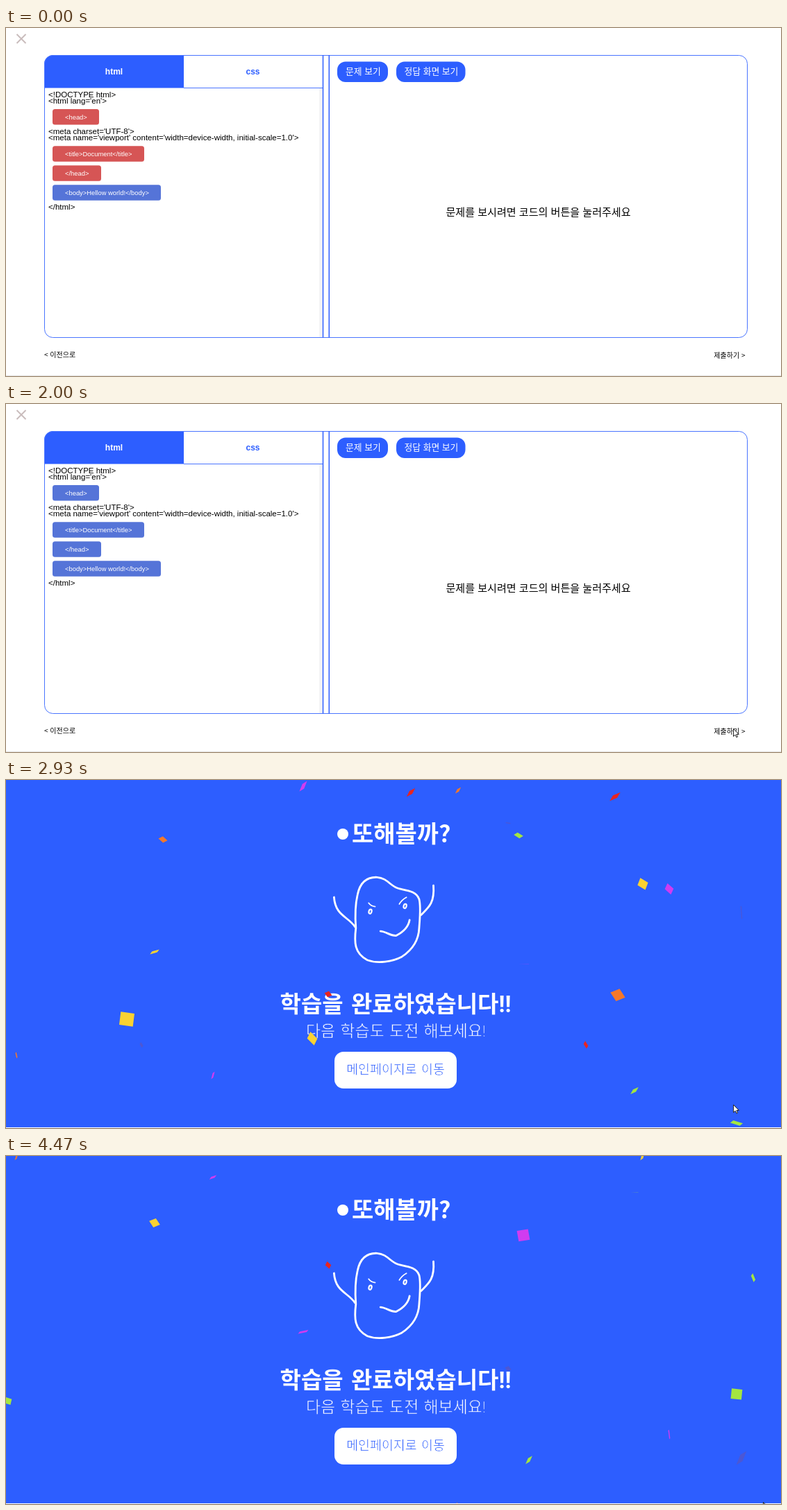
Animation, 1116 px wide and 502 px high, one loop 4540 ms. Source, as an HTML page with a canvas:

```html
<!DOCTYPE html>
<html lang="ko">
<head>
<meta charset="UTF-8">
<title>학습 완료</title>
<style>
  html, body { margin: 0; width: 100%; height: 100%; overflow: hidden; background: #fff; }
  svg, canvas { position: absolute; left: 0; top: 0; width: 1116px; height: 502px; display: block; }
  text { font-family: "Noto Sans CJK KR", "Noto Sans CJK", "Noto Sans CJK JP", sans-serif; white-space: pre; }
  .latin { font-family: "Liberation Sans", Arial, sans-serif; }
  .mixed { font-family: Roboto, "Noto Sans CJK KR", "Noto Sans CJK", "Noto Sans CJK JP", sans-serif; }
</style>
</head>
<body>
<svg viewBox="0 0 1116 502">
  <g id="editor"></g>
  <g id="done"></g>
</svg>
<canvas id="fx" width="1116" height="502"></canvas>
<script>
const LOOP = 4540, FPS = 15, SWITCH = 2060;
const BLUE = '#2d5eff', EDGE = '#4a75ff';
const editor = document.getElementById('editor');
const done = document.getElementById('done');
const ctx = document.getElementById('fx').getContext('2d');

function add(parent, tag, attrs, text) {
  const el = document.createElementNS('http://www.w3.org/2000/svg', tag);
  for (const k in attrs) el.setAttribute(k, attrs[k]);
  if (text) el.textContent = text;
  parent.appendChild(el);
  return el;
}
const box = (g, x, y, width, height, rx, fill) => add(g, 'rect', { x, y, width, height, rx, fill });
const line = (g, d, stroke, width) => add(g, 'path', { d, stroke, 'stroke-width': width, fill: 'none' });
const label = (g, text, x, y, size, fill, more) =>
  add(g, 'text', { x, y, 'font-size': size, fill, ...more }, text);

const clamp = v => Math.min(1, Math.max(0, v));
const mix = (a, b, f) => a + (b - a) * f;

// Editor page
const tags = [];
function buildEditor() {
  const latin = { class: 'latin' };
  const tab = { class: 'latin', 'font-weight': 700, 'text-anchor': 'middle' };
  const medium = { 'font-weight': 500 };

  line(editor, 'M15.5 9L28.5 22M28.5 9L15.5 22', '#c9bcbc', 2);
  box(editor, 451, 87, 4.5, 359, 0, '#f4f4f5');
  add(editor, 'path', { d: 'M55 86.5V52A13 13 0 0 1 68 39H256V86.5Z', fill: BLUE });
  add(editor, 'rect', { x: 55.5, y: 39.5, width: 1012, height: 407, rx: 12, fill: 'none', stroke: EDGE });
  line(editor, 'M256 86.5H456', EDGE, 1);
  line(editor, 'M456.5 39V446.5M465.3 39V446.5', BLUE, 1.5);
  label(editor, 'html', 155.5, 67, 12, '#fff', tab);
  label(editor, 'css', 355.5, 67, 12, BLUE, tab);

  // Plain lines are 9.4 px apart, blocks (marked *) take 28 px
  const code = [
    '<!DOCTYPE html>', "<html lang='en'>", '*<head>', "<meta charset='UTF-8'>",
    "<meta name='viewport' content='width=device-width, initial-scale=1.0'>",
    '*<title>Document</title>', '*</head>', '*<body>Hellow world!</body>', '</html>'
  ];
  let y = 91;
  code.forEach((row, i) => {
    if (row[0] !== '*') {
      label(editor, row, 61, y + 9, 11.5, '#000', latin);
      y += 9.3;
      return;
    }
    const block = box(editor, 67, y + 7.5, 0, 22.5, 3.5, '#5574d8');
    const text = label(editor, row.slice(1), 85, y + 21.9, 9.4, '#fff', latin);
    block.setAttribute('width', Math.round(text.getComputedTextLength() + 35.5));
    if (tags.length < 3) tags.push(block);
    y += code[i + 1][0] === '*' ? 28 : 34.5;
  });

  box(editor, 477, 48.5, 73, 29.5, 12, BLUE);
  box(editor, 562, 48.5, 99.5, 29.5, 12, BLUE);
  label(editor, '문제 보기', 489, 67, 12.8, '#fff', medium);
  label(editor, '정답 화면 보기', 573.5, 67, 12.8, '#fff', medium);
  label(editor, '문제를 보시려면 코드의 버튼을 눌러주세요', 766.5, 270.7, 15.05, '#000',
    { ...medium, 'text-anchor': 'middle' });
  label(editor, '< 이전으로', 55, 474.8, 10, '#000', medium);
  label(editor, '제출하기 >', 1064.5, 475.8, 10, '#000', { ...medium, 'text-anchor': 'end' });
  box(editor, 0, 501, 1116, 1, 0, '#e6e6e6');
}

// Completion page; an outline in the background colour thins light text
function buildDone() {
  const mixed = { class: 'mixed', 'text-anchor': 'middle' };
  const thin = back => ({ ...mixed, 'font-weight': 300, stroke: back, 'stroke-width': 0.6, 'word-spacing': 1.8 });
  box(done, 0, 0, 1116, 501, 0, BLUE);
  add(done, 'circle', { cx: 485, cy: 78, r: 8, fill: '#fff' });
  label(done, '또해볼까?', 498, 90, 34, '#fff', { 'font-weight': 900 });
  label(done, '학습을 완료하였습니다!!', 561, 334.5, 33, '#fff', { ...mixed, 'font-weight': 700, 'word-spacing': 3 });
  label(done, '다음 학습도 도전 해보세요!', 561.5, 370, 22.9, '#fff', thin(BLUE));
  box(done, 473, 392, 176, 53, 13, '#fff');
  label(done, '메인페이지로 이동', 561, 424, 18.4, BLUE, thin('#fff'));
}

// Mascot
const BODY = new Path2D('M553 139C536 137 527 148 523 162C518 178 517 196 517 210C513 230 512 246 530 257' +
  'C545 264 566 262 580 256C596 247 606 234 608 216C610 202 613 186 611 175C608 164 598 162 584 158' +
  'C572 155 568 141 553 139Z');
const LIMBS = new Path2D('M489 163C489 190 507 192 516 208M633 157C633 182 624 188 612 198' +
  'M552 217C560 218 566 225 574 225C586 220 593 212 595 204');
const BROWS = new Path2D('M538 175Q541 180 547 181M582 180Q586 174 593 171');

function drawMascot(t) {
  const swing = (1 - Math.cos(2 * Math.PI * (t - 2950) / 1500)) / 2;
  ctx.save();
  ctx.translate(561, 388);
  ctx.rotate(mix(-4.3, 0.9, swing) * Math.PI / 180);
  ctx.translate(-561, -388);
  ctx.strokeStyle = '#fff';
  ctx.lineCap = ctx.lineJoin = 'round';
  ctx.lineWidth = 2.8;
  ctx.stroke(BODY);
  ctx.stroke(LIMBS);
  ctx.lineWidth = 1.7;
  ctx.stroke(BROWS);
  ctx.lineWidth = 2.2;
  for (const [x, y] of [[539.5, 187.5], [590, 183.5]]) {
    ctx.beginPath();
    ctx.ellipse(x, y, 2, 3.2, 0.3, 0, 2 * Math.PI);
    ctx.stroke();
  }
  ctx.restore();
}

// Confetti: colour and place at 2400 ms, from the largest piece to the smallest
const INK = { y: '#fad232', r: '#e8241f', p: '#d03cf0', o: '#f5782a', l: '#a4e640', s: '#4c57d4' };
const FAST = {
  speed: 318.6, size: 16.5, shrink: 0.94,
  pieces: [
    ['p', 745, 96], ['l', 1052, 325], ['r', 877, 494], ['y', 917, -20], ['r', 583, 488], ['y', 214, 78],
    ['l', 753, 420], ['l', 738, -90], ['o', 226, -84], ['l', 3, 335], ['o', 651, 485], ['r', 464, 139]
  ]
};
const SLOW = {
  speed: 159.5, size: 20, shrink: 0.91,
  pieces: [
    ['y', 174, 260], ['s', 1059, 106], ['o', 881, 225], ['y', 441, 288], ['p', 428, -76], ['p', 955, 72],
    ['l', 905, 363], ['l', 1076, 486], ['p', 298, 341], ['r', 835, 297], ['o', 15, 312], ['s', 723, -23],
    ['s', 195, 297]
  ]
};
const FALL = 640, TOP = -89;

// Each piece makes three turns about the axis (1,1,1) per fall
function drawConfetti({ speed, size, shrink, pieces }, t) {
  pieces.forEach(([ink, x, y0], i) => {
    const run = y0 - TOP + speed * (t - 2400) / 1000;
    const y = ((run % FALL) + FALL) % FALL + TOP;
    const a = (y - 124) / FALL * 6 * Math.PI;
    const c = Math.cos(a), s = Math.sin(a) / Math.sqrt(3), k = (1 - c) / 3;
    const w = size * shrink ** i, h = w * 0.95;
    ctx.save();
    ctx.transform(c + k, k + s, k - s, c + k, x, y);
    ctx.fillStyle = INK[ink];
    ctx.fillRect(-w / 2, -h / 2, w, h);
    ctx.restore();
  });
}

// Pointer: time, x, y
const STOPS = [
  [133, 968, 487], [600, 909, 392], [1067, 1041, 453], [1400, 1047, 468], [2930, 1047, 468], [4467, 1090, 499]
];
const ARROW = new Path2D('M0 0V11L2.6 8.7L4.4 12.4L6 11.6L4.4 8H7.8Z');

function drawPointer(t) {
  if (t < 130) return;
  const i = Math.max(1, STOPS.findIndex(stop => stop[0] >= t));
  const [a, b] = [STOPS[i - 1], STOPS[i]];
  const f = clamp((t - a[0]) / (b[0] - a[0]));
  ctx.save();
  ctx.translate(mix(a[1], b[1], f) + 0.5, mix(a[2], b[2], f) + 0.5);
  ctx.fillStyle = '#fff';
  ctx.strokeStyle = '#222';
  ctx.lineWidth = 1;
  ctx.fill(ARROW);
  ctx.stroke(ARROW);
  ctx.restore();
}

const WRONG = [214, 85, 85], SOLVED = [85, 116, 216];
function paintTags(t) {
  const f = clamp((t - 1467) / 333);
  const rgb = WRONG.map((v, i) => Math.round(mix(v, SOLVED[i], f)));
  for (const el of tags) el.setAttribute('fill', `rgb(${rgb})`);
}

function render(now) {
  // Motion is held at 15 steps per second, like a screen recording
  const step = Math.floor((now % LOOP) * FPS / 1000 + 0.21);
  const t = Math.min(Math.min(step, 67) * 1000 / FPS, 4467);
  const finished = t >= SWITCH;
  editor.style.display = finished ? 'none' : '';
  done.style.display = finished ? '' : 'none';
  ctx.clearRect(0, 0, 1116, 502);
  if (finished) {
    ctx.save();
    ctx.beginPath();
    ctx.rect(0, 0, 1116, 501);
    ctx.clip();
    drawMascot(t);
    drawConfetti(FAST, t);
    drawConfetti(SLOW, t);
    ctx.restore();
  } else {
    paintTags(t);
  }
  drawPointer(t);
}

buildEditor();
buildDone();
const start = performance.now();
function tick() {
  render(performance.now() - start);
  requestAnimationFrame(tick);
}
tick();
</script>
</body>
</html>
```
